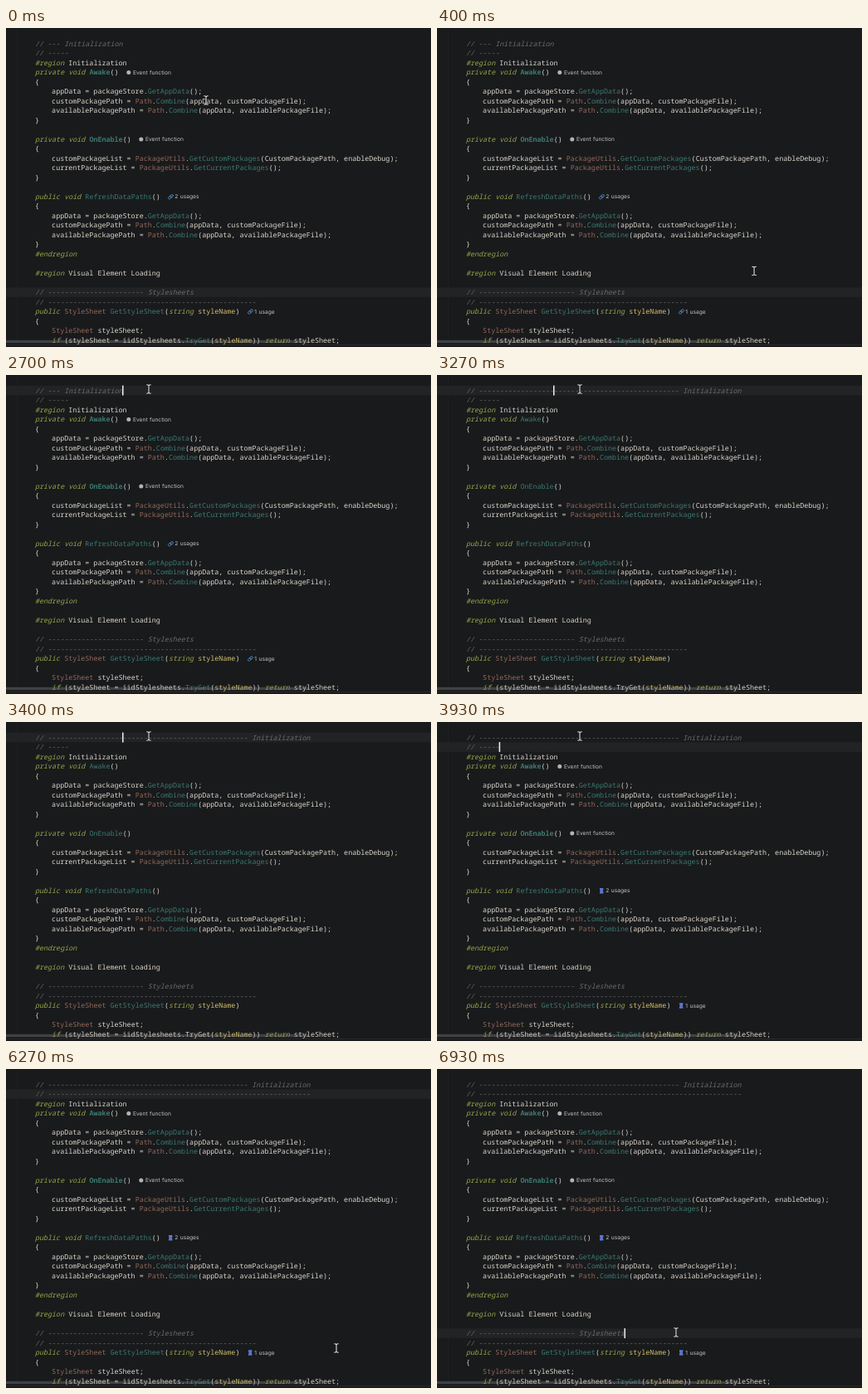
An HTML page for the animation above (8000 ms loop, 512 by 384 pixels).

```html
<!DOCTYPE html>
<html lang="en">
<head>
<meta charset="utf-8">
<title>Code editor</title>
<style>
html, body { margin: 0; width: 100%; height: 100%; overflow: hidden; background: #191a1c; }
svg { display: block; width: 100vw; height: 100vh; }
text { white-space: pre; text-rendering: geometricPrecision; }
.code { font: 500 8.38px "Noto Sans Mono", "DejaVu Sans Mono", monospace; fill: #dcd6ca; }
.c { fill: #6b6b6a; font-style: italic; font-weight: 400; }
.k { fill: #98a548; font-style: italic; }
.m, .b, .s { fill: #3b7a70; }
.b { font-weight: 700; }
.t { fill: #92695a; }
.p { fill: #d3c06a; }
.plain .b { font-weight: 500; }
.plain .s { fill: #dcd6ca; }
.hint { font: 6.65px Inter, "Open Sans", sans-serif; fill: #c4c4c4; word-spacing: .6px; }
</style>
</head>
<body>
<svg id="stage" viewBox="0 0 512 384" preserveAspectRatio="none"></svg>
<script>
const LOOP = 8000, LEFT = 35, ADVANCE = 5.03, TOP = 18.6, PITCH = 11.52;
const stage = document.getElementById('stage');

function add(parent, tag, attrs, content) {
  const el = document.createElementNS('http://www.w3.org/2000/svg', tag);
  for (const key in attrs) el.setAttribute(key, attrs[key]);
  if (content) el.textContent = content;
  parent.appendChild(el);
  return el;
}
const rowY = row => TOP + row * PITCH;
const colX = col => LEFT + col * ADVANCE;
const show = (el, on) => el.setAttribute('visibility', on ? 'visible' : 'hidden');
const dashes = n => '-'.repeat(n);

// Markup: [style words] colours a run, everything else is default text.
const paths = [
  '    appData = packageStore.[m GetAppData]();',
  '    customPackagePath = [t Path].[m Combine](appData, customPackageFile);',
  '    availablePackagePath = [t Path].[m Combine](appData, availablePackageFile);',
  '}'
];
const lines = [
  '', '',
  '[k #region] Initialization',
  '[k private void] [b Awake]()',
  '{', ...paths, '',
  '[k private void] [b OnEnable]()',
  '{',
  '    customPackageList = [t PackageUtils].[m GetCustomPackages](CustomPackagePath, enableDebug);',
  '    currentPackageList = [t PackageUtils].[m GetCurrentPackages]();',
  '}', '',
  '[k public void] [m RefreshDataPaths]()',
  '{', ...paths,
  '[k #endregion]', '',
  '[k #region] Visual Element Loading', '',
  `[c // ${dashes(23)} Stylesheets]`,
  `[c // ${dashes(50)}]`,
  '[k public] [t StyleSheet] [m GetStyleSheet]([k string] [p styleName])',
  '{',
  '    [t StyleSheet] styleSheet;',
  '    [k if] (styleSheet = iidStylesheets.[s TryGet]([p styleName])) [k return] styleSheet;'
];

function drawLine(parent, source, row) {
  let col = 0;
  for (const part of source.match(/\[\w [^\]]+\]|[^\[]+/g) || []) {
    const styled = part[0] === '[';
    const body = styled ? part.slice(3, -1) : part;
    const lead = body.length - body.trimStart().length;
    add(parent, 'text', { x: colX(col + lead), y: rowY(row) + 2.9, class: styled ? part[1] : '' }, body.trimStart());
    col += body.length;
  }
}

add(stage, 'rect', { width: 512, height: 384, fill: '#191a1c' });
const band = add(stage, 'rect', { width: 512, height: PITCH, fill: '#222325' });
add(stage, 'rect', { x: 13, width: .7, height: 376, fill: '#222325' });

const code = add(stage, 'g', { class: 'code' });
lines.forEach((line, row) => drawLine(code, line, row));

const variant = (row, source) => {
  const g = add(code, 'g', {});
  drawLine(g, source, row);
  return g;
};
const titleShort = variant(0, '[c // --- Initialization]');
const titleLong = variant(0, `[c // ${dashes(48)} Initialization]`);
const ruleShort = variant(1, '[c // -----]');
const ruleLong = variant(1, `[c // ${dashes(63)}]`);

const hints = add(stage, 'g', { class: 'hint' });
const links = add(hints, 'g', { fill: 'none', stroke: '#5289bd', 'stroke-width': .9 });
const waits = add(hints, 'g', { fill: '#5c76cf' });
function hint(row, x, label) {
  add(hints, 'text', { x, y: rowY(row) + 2.5 }, label);
}
for (const [row, x] of [[3, 153], [10, 168]]) {
  hint(row, x, 'Event function');
  add(hints, 'circle', { cx: x - 5.2, cy: rowY(row) + .3, r: 2.5, fill: '#b4b4b4' });
}
for (const [row, x, label] of [[16, 203.3, '2 usages'], [28, 299.3, '1 usage']]) {
  const y = rowY(row);
  hint(row, x, label);
  const link = add(links, 'g', { transform: `translate(${x - 4.9} ${y + .3}) rotate(-40)` });
  for (const dx of [-3.4, -.5]) add(link, 'rect', { x: dx, y: -1.4, width: 3.9, height: 2.8, rx: 1.4 });
  add(waits, 'path', { d: `M${x - 7.3} ${y - 2.9}h4.4v1.7l-.6 1.5l.6 1.5v1.7h-4.4v-1.7l.6 -1.5l-.6 -1.5z` });
}

add(stage, 'rect', { y: 375.8, width: 365, height: 3.4, fill: '#8a8a8a', opacity: .35 });
add(stage, 'rect', { y: 381, width: 512, height: 1, fill: '#2b282c' });

const caret = add(stage, 'rect', { width: 1.5, height: 12, fill: '#f0f0f0' });
const pointer = add(stage, 'g', { fill: 'none' });
const beam = 'M-2.7 -5.2Q-.4 -5.2 0 -4.2Q.4 -5.2 2.7 -5.2M0 -4.2V4.2M-2.7 5.2Q-.4 5.2 0 4.2Q.4 5.2 2.7 5.2';
add(pointer, 'path', { d: beam, stroke: '#0c0c0d', 'stroke-width': 2.2, opacity: .7 });
add(pointer, 'path', { d: beam, stroke: '#e6e6e6', 'stroke-width': 1.1 });

const smooth = u => u * u * (3 - 2 * u);
const easeIn = u => Math.pow(u, 1.6);
const easeOut = u => 1 - Math.pow(1 - u, 1.8);

// Pointer moves: start, end, from, bend, to, easing.
const moves = [
  [30, 530, [241, 87], [600, 200], [300, 338], smooth],
  [730, 1160, [300, 338], [230, 170], [172, 17], smooth],
  [5970, 6270, [172, 17], [270, 210], [398, 336], easeIn],
  [6270, 6770, [398, 336], [569, 352], [288, 317], easeOut]
];
function pointerAt(t) {
  const [start, end, a, b, c, ease] = moves.filter(m => t >= m[0]).pop() || moves[0];
  const u = ease(Math.min(1, Math.max(0, (t - start) / (end - start))));
  return a.map((v, i) => (1 - u) * (1 - u) * v + 2 * u * (1 - u) * b[i] + u * u * c[i]);
}

// Caret visibility: from, until, row, column.
const caretSpans = [
  [1170, 2200, 0, 21], [2700, 3930, 0, 21],
  [3930, 5130, 1, 8], [5330, 5970, 1, 8],
  [6900, LOOP, 26, 38]
];

function render(t) {
  const busy = t >= 3270 && t < 3580;
  const row = t < 1170 ? 26 : t < 3930 ? 0 : t < 6900 ? 1 : 26;
  band.setAttribute('y', rowY(row) - PITCH / 2);
  show(titleShort, t < 3270);
  show(titleLong, t >= 3270);
  show(ruleShort, t < 5330);
  show(ruleLong, t >= 5330);
  code.setAttribute('class', busy ? 'code plain' : 'code');
  hints.setAttribute('display', busy ? 'none' : 'inline');
  show(links, t < 3270);
  show(waits, t >= 3270);

  const span = caretSpans.find(s => t >= s[0] && t < s[1]);
  show(caret, span);
  if (span) {
    caret.setAttribute('x', colX(span[3]) - .6);
    caret.setAttribute('y', rowY(span[2]) - 6);
  }
  pointer.setAttribute('transform', `translate(${pointerAt(t).join(' ')})`);
}

let origin;
function tick(now) {
  origin ??= now;
  render((now - origin) % LOOP);
  requestAnimationFrame(tick);
}
render(0);
requestAnimationFrame(tick);
</script>
</body>
</html>
```
